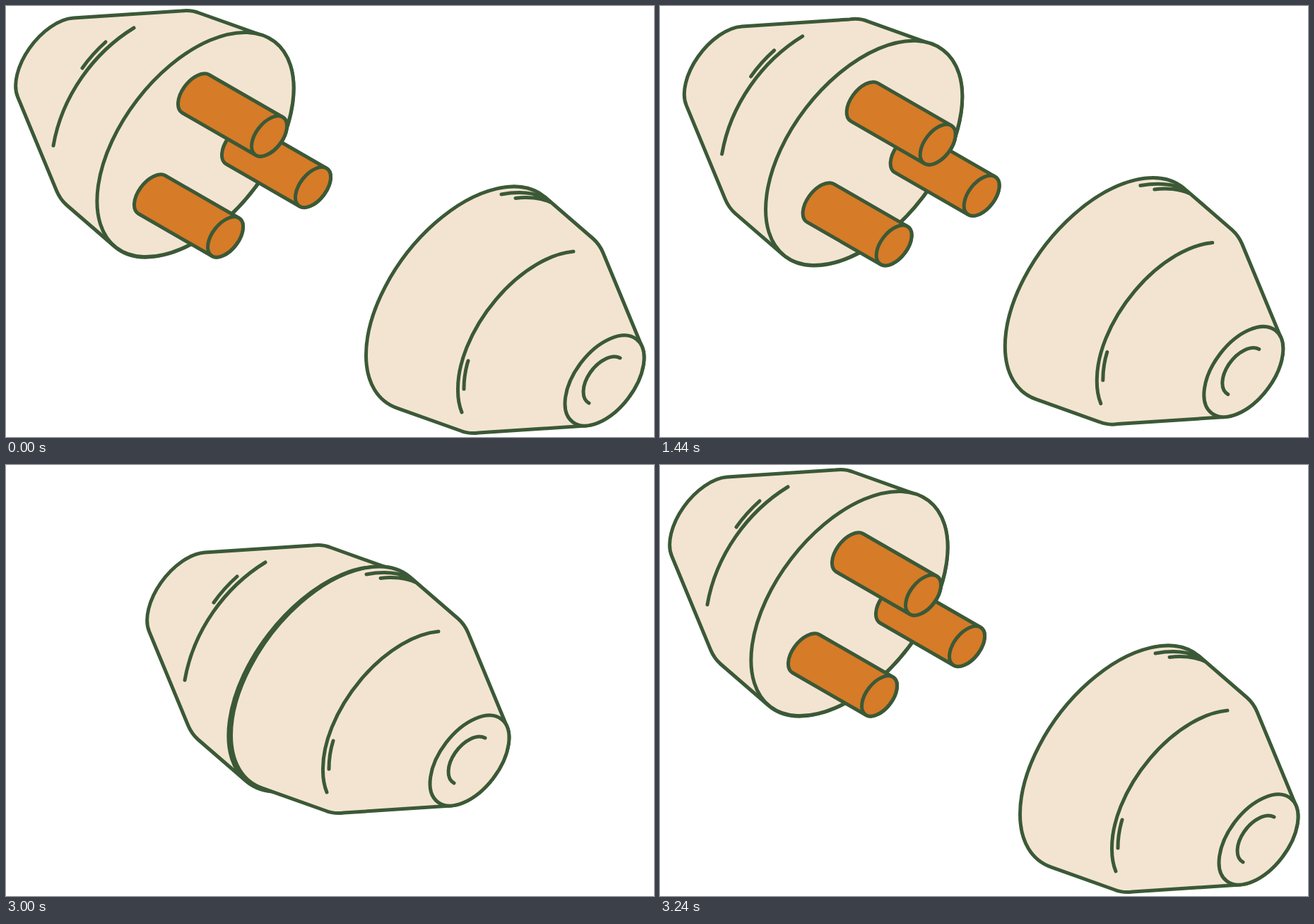
These frames come from a looping animation (917 px wide and 611 px high, 3280 ms). An HTML page without scripts:

```html
<!DOCTYPE html>
<html lang="en">
<head>
<meta charset="utf-8">
<title>Plug and socket</title>
<style>
  @property --closed { syntax: "<number>"; inherits: true; initial-value: 0; }

  html, body { margin: 0; width: 100%; height: 100%; overflow: hidden; background: #fff; }

  svg {
    display: block;
    width: 100vw;
    height: 100vh;
    fill: #f3e4d2;
    stroke: #3b5937;
    stroke-width: 5;
    stroke-linecap: round;
    stroke-linejoin: round;
    animation: connect 3280ms step-end infinite;
  }

  .plug { transform: translate(calc(var(--closed) * 186px), calc(var(--closed) * 107px)); }
  .socket { transform: translate(calc(var(--closed) * -191px), calc(var(--closed) * -112px)); }
  .line { fill: none; }
  .prong { fill: #d67b28; }

  /* Quadratic ease at 25 fps: accelerate shut, decelerate open */
  @keyframes connect {
    0%, 98.78% { --closed: 0; }
    42.68%, 97.56% { --closed: .0278; }
    43.9%, 96.34% { --closed: .1111; }
    45.12%, 95.12% { --closed: .25; }
    46.34%, 93.9% { --closed: .4444; }
    47.56%, 92.68% { --closed: .6944; }
    48.78% { --closed: 1; }
    100% { --closed: 0; }
  }
</style>
</head>
<body>
<svg viewBox="0 0 917 611">
  <defs>
    <path id="shell" d="M554.4 570.3A184 104 -52.5 0 1 509.5 495A184 104 -52.5 0 1 762.9 271
      L831 330Q840 338 845 350L900 483A74 41.8 -52.5 0 1 821.3 595L669 605Q655 607 643 602Z"/>
    <g id="prong">
      <path d="M19 -27A33 18.7 -52.5 0 0 -19 27L85 87A33 18.7 -52.5 0 0 123 33Z"/>
      <ellipse rx="33" ry="18.7" transform="translate(104 60) rotate(-52.5)"/>
    </g>
  </defs>

  <g class="plug">
    <use href="#shell" transform="rotate(180 458.3 306)"/>
    <ellipse rx="184" ry="104" transform="translate(268 196.5) rotate(-52.5)"/>
    <path class="line" d="M181 31C124 66 79 128 67 198M141 51Q122 68 108 88"/>
    <g class="prong">
      <use href="#prong" x="330.5" y="197"/>
      <use href="#prong" x="268.5" y="124.5"/>
      <use href="#prong" x="206.5" y="267.5"/>
    </g>
  </g>

  <g class="socket">
    <use href="#shell"/>
    <ellipse rx="74" ry="41.8" transform="translate(847 531) rotate(-52.5)"/>
    <g class="line">
      <path d="M803 348A150 85 -52.5 0 0 639.5 542A150 85 -52.5 0 0 645 576"/>
      <path d="M654 503Q648 522 648 543"/>
      <path d="M869 499A38.8 23 -52.5 0 0 825 563"/>
      <path d="M701 267C718 264 742 263 760 271M721 272.5C738 270 757 272 770 278"/>
    </g>
  </g>
</svg>
</body>
</html>
```
